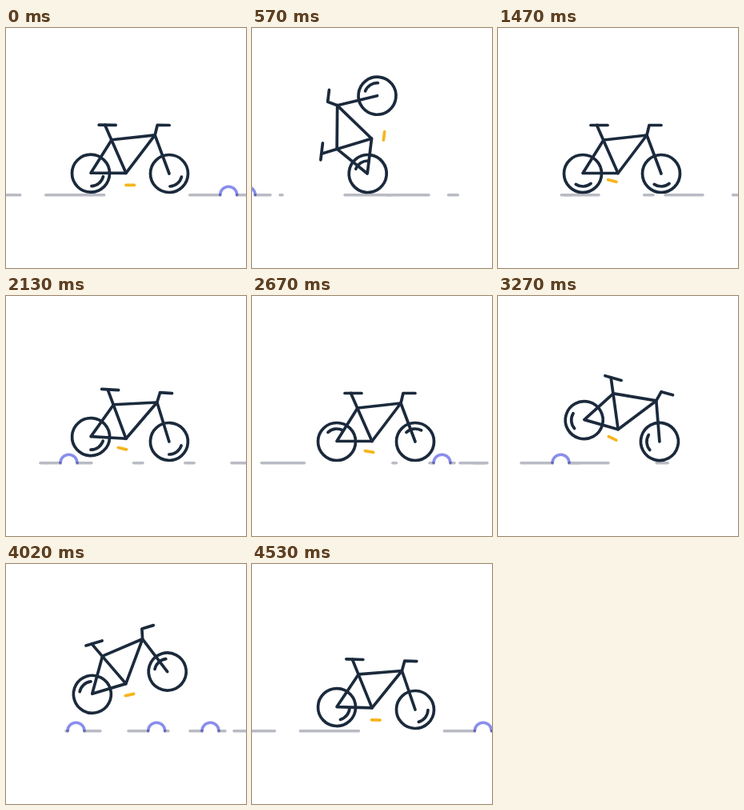
These frames come from a looping animation (300 by 300 pixels, 4.56 s). An HTML page with a canvas:

```html
<!DOCTYPE html>
<html lang="en">
<head>
<meta charset="utf-8">
<title>Bike ride</title>
<style>
  html, body { margin: 0; width: 100%; height: 100%; overflow: hidden; background: #fff; }
  canvas { display: block; width: 100vw; height: 100vh; }
</style>
</head>
<body>
<canvas width="300" height="300"></canvas>
<script>
const ctx = document.querySelector('canvas').getContext('2d');
const LOOP = 4560, SPEED = 0.5, STRIP = LOOP * SPEED, GROUND = 208.7, AXLE = 182;
const NAVY = '#1b2a3c', GREY = '#b9bbc4', VIOLET = '#898eec', AMBER = '#f5b51b';

const rad = deg => deg * Math.PI / 180;
const mod = (a, n) => (a % n + n) % n;

// Smooth swell from 0 to `peak` and back between two times of the loop.
function pulse(t, from, to, peak) {
  const u = mod(t - from, LOOP) / (to - from);
  return u < 1 ? peak * Math.sin(Math.PI * u) ** 2 : 0;
}

const scroll = t => SPEED * t + pulse(t, 0, 1140, 61) + pulse(t, 4020, 4900, 70);
const spin = t => 50 + 6 * 360 * t / LOOP + pulse(t, 570, 3200, 78) + pulse(t, 3270, 4530, 98);
const lift = t => pulse(t, 3830, 4500, 31.5);
const crank = t => pulse(t, 570, 4530, 37) + pulse(t, 600, 2340, 42) + pulse(t, 2800, 4530, 21);
const tilt = t => pulse(t, 80, 1180, -85.5)                            // long wheelie
  + pulse(t, 1700, 2060, -9.7) + pulse(t, 2060, 2400, 9.2)             // small bump
  + pulse(t, 2670, 3000, -14) + pulse(t, 3000, 3450, 17.7)             // bigger bump
  + pulse(t, 3780, 4200, -17.7) + pulse(t, 4150, 4575, 17);            // jump

let seed = 7;
const random = () => (seed = seed * 16807 % 2147483647) / 2147483647;

// Positions along the ground strip: bumps, long dashes, then short ones between.
const bumps = [340, 1144, 1573, 1714, 2098, 2198.7, 2266];
const dashes = [[110, 186], [290, 371], [461, 569], [817, 863], [943, 993], [1114, 1174],
  [1346, 1387], [1556, 1590], [1594, 1631], [1663, 1775], [2084, 2130], [2162, 2215],
  [2239, 2286], [2294, 2361]];
for (let x = 380; x < STRIP - 250; x += 60 + 80 * random()) dashes.push([x, x + 6 + 12 * random()]);

function line(...pts) {
  ctx.beginPath();
  pts.forEach(([x, y]) => ctx.lineTo(x, y));
  ctx.stroke();
}

function arc(x, y, r, from, to) {
  ctx.beginPath();
  ctx.arc(x, y, r, rad(from), rad(to));
  ctx.stroke();
}

function drawGround(t) {
  const toScreen = x => mod(x - scroll(t) + 150, STRIP) - 150;
  ctx.lineWidth = 3.6;
  ctx.strokeStyle = GREY;
  for (const [a, b] of dashes) {
    const x = toScreen(a);
    line([x + 1.5, GROUND], [x + b - a - 1.5, GROUND]);
  }
  ctx.strokeStyle = VIOLET;
  for (const x of bumps.map(toScreen)) {
    ctx.fillRect(x - 9, GROUND - 3, 18, 6);
    ctx.globalCompositeOperation = 'multiply';
    arc(x, GROUND, 10.5, 180, 360);
    ctx.globalCompositeOperation = 'source-over';
  }
}

function drawWheel(x, angle) {
  arc(x, 0, 23.5, 0, 360);
  arc(x, 0, 16, angle - 36, angle + 36);
}

function drawBike(t) {
  const a = rad(tilt(t)), angle = spin(t), c = crank(t);
  // The wheel that stays low carries the bike.
  const rise = (a < 0 ? -44 : 54) * Math.sin(a) + lift(t);
  ctx.save();
  ctx.translate(150, AXLE - rise);
  ctx.rotate(a);
  ctx.lineWidth = 3.7;
  ctx.strokeStyle = NAVY;
  drawWheel(-44, angle);
  drawWheel(54, angle);
  line([-18, -42], [-44, -0.5], [0, -0.5], [36, -48], [-18, -42]);
  line([0, -0.5], [-26.5, -60.5]);
  line([-34, -60.5], [-13, -60.5]);
  line([54, 0], [36, -48], [39, -60.5], [54, -60.5]);
  ctx.rotate(rad(c));
  ctx.translate(0, 14.5);
  ctx.rotate(rad(-0.75 * c));
  ctx.strokeStyle = AMBER;
  line([0, 0], [10.5, 0]);
  ctx.restore();
}

function draw() {
  const t = performance.now() % LOOP;
  ctx.fillStyle = '#fff';
  ctx.fillRect(0, 0, 300, 300);
  ctx.lineCap = ctx.lineJoin = 'round';
  drawGround(t);
  drawBike(t);
  requestAnimationFrame(draw);
}
draw();
</script>
</body>
</html>
```
